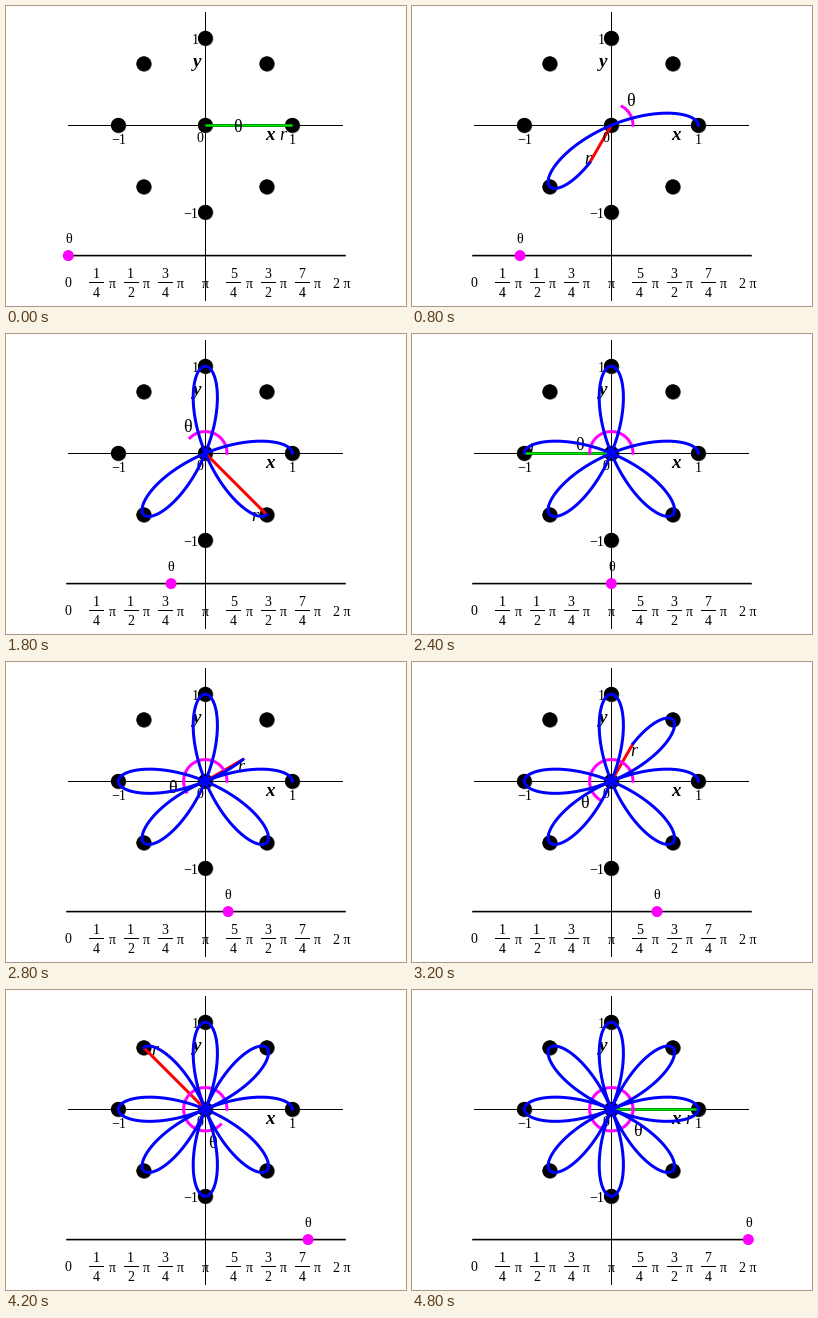
Write a matplotlib script that moves like this. It is 400 px wide and 300 px high and loops after 4.9 s.

```python
import numpy as np
import matplotlib.pyplot as plt
from matplotlib.animation import FuncAnimation
from matplotlib.patches import Circle

W, H, DPI = 400, 300, 100
FRAMES, INTERVAL = 49, 100
CX, CY, UNIT = 199.3, 119.25, 87
ARC = 21.7
BAR_Y, BAR_X0, BAR_X1 = 249.6, 62.3, 336.3
BLUE, MAGENTA, RED = "#0000ff", "#ff00ff", "#ff0000"
GREEN, DARK_GREEN = "#00e800", "#00a000"

plt.rcParams["font.family"] = "Liberation Serif"
fig = plt.figure(figsize=(W / DPI, H / DPI), dpi=DPI, facecolor="white")
ax = fig.add_axes([0, 0, 1, 1])
ax.set(xlim=(0, W), ylim=(H, 0))
ax.axis("off")


def pt(px):
    return px * 72 / DPI


def line(xs, ys, color, width, z, **kw):
    return ax.plot(xs, ys, color=color, lw=pt(width), zorder=z, **kw)[0]


def disc(x, y, r, color, z):
    return ax.add_patch(Circle((x, y), r, fc=color, lw=0, zorder=z))


def label(x, base, s, size=14, z=4, **kw):
    return ax.text(x, base, s, fontsize=pt(size), ha="center",
                   va="baseline", zorder=z, **kw)


def polar(r, t):
    return CX + r * np.cos(t), CY - r * np.sin(t)


def rose(t):
    return np.cos(4 * t)


# Axes, slider track and marker dots
line([62, 336], [CY, CY], "black", 1, 1)
line([CX, CX], [6, 294], "black", 1, 1)
line([61, 339], [BAR_Y, BAR_Y], "black", 1.6, 1, snap=False)
spots = [polar(UNIT, k * np.pi / 4) for k in range(8)] + [(CX, CY)]
for x, y in spots:
    disc(x + 0.4, y + 0.4, 7.6, "#606060", 2)
    disc(x, y, 7.4, "black", 2)

# Axis labels
label(286, 137.5, "1")
label(112.7, 138, "\u22121")
label(189.2, 38, "1")
label(184.4, 212, "\u22121")
label(193.8, 136, "0")
label(263.7, 134, "x", 19, weight="bold", style="italic")
label(190.8, 61, "y", 19, weight="bold", style="italic")

# Slider scale in steps of pi/4
step = (BAR_X1 - BAR_X0) / 8
label(BAR_X0, 281, "0")
label(CX, 281.5, "π")
label(BAR_X1 - 0.5, 281.5, "2 π")
for k, num, den in [(1, 1, 4), (2, 1, 2), (3, 3, 4),
                    (5, 5, 4), (6, 3, 2), (7, 7, 4)]:
    x = BAR_X0 + k * step - 6.2
    label(x, 272, str(num))
    label(x, 291, str(den))
    line([x - 7, x + 7], [276, 276], "black", 1, 4)
    label(x + 16, 281.5, "π")

# Moving parts
radius = line([], [], RED, 3, 3, solid_capstyle="butt")
core = line([], [], GREEN, 1, 3, solid_capstyle="butt")
arc = line([], [], MAGENTA, 3, 5)
curve = line([], [], BLUE, 3, 6)
knob = disc(BAR_X0, BAR_Y, 5.5, MAGENTA, 5)
knob_label = label(0, 0, "θ")
arc_label = label(0, 0, "θ", 18)
r_label = label(0, 0, "r", 18, style="italic")


def draw(i):
    t = 2 * np.pi * i / (FRAMES - 1)
    r = rose(t)
    path = np.linspace(0, t, 2 + 16 * i)
    curve.set_data(*polar(UNIT * rose(path), path))
    arc.set_data(*polar(ARC, path))
    for part in (curve, arc):
        part.set_visible(i > 0)

    px, py = polar(UNIT * r, t)
    for part in (radius, core):
        part.set_data([CX, px], [CY, py])
    radius.set_color(DARK_GREEN if r >= 0 else RED)
    core.set_visible(r >= 0)

    x, y = polar(33, 0.9 * t)
    arc_label.set_position((x - 0.6, y + 7))
    x, y = polar(0.9 * UNIT * r, t - 0.1)
    r_label.set_position((x - 0.5, y + 6.8))

    x = BAR_X0 + (BAR_X1 - BAR_X0) * t / (2 * np.pi)
    knob.center = x, BAR_Y
    knob_label.set_position((x, 237))
    return curve, arc, radius, core, knob, arc_label, r_label, knob_label


anim = FuncAnimation(fig, draw, frames=FRAMES, interval=INTERVAL,
                     repeat=True, repeat_delay=0)
plt.show()
```
